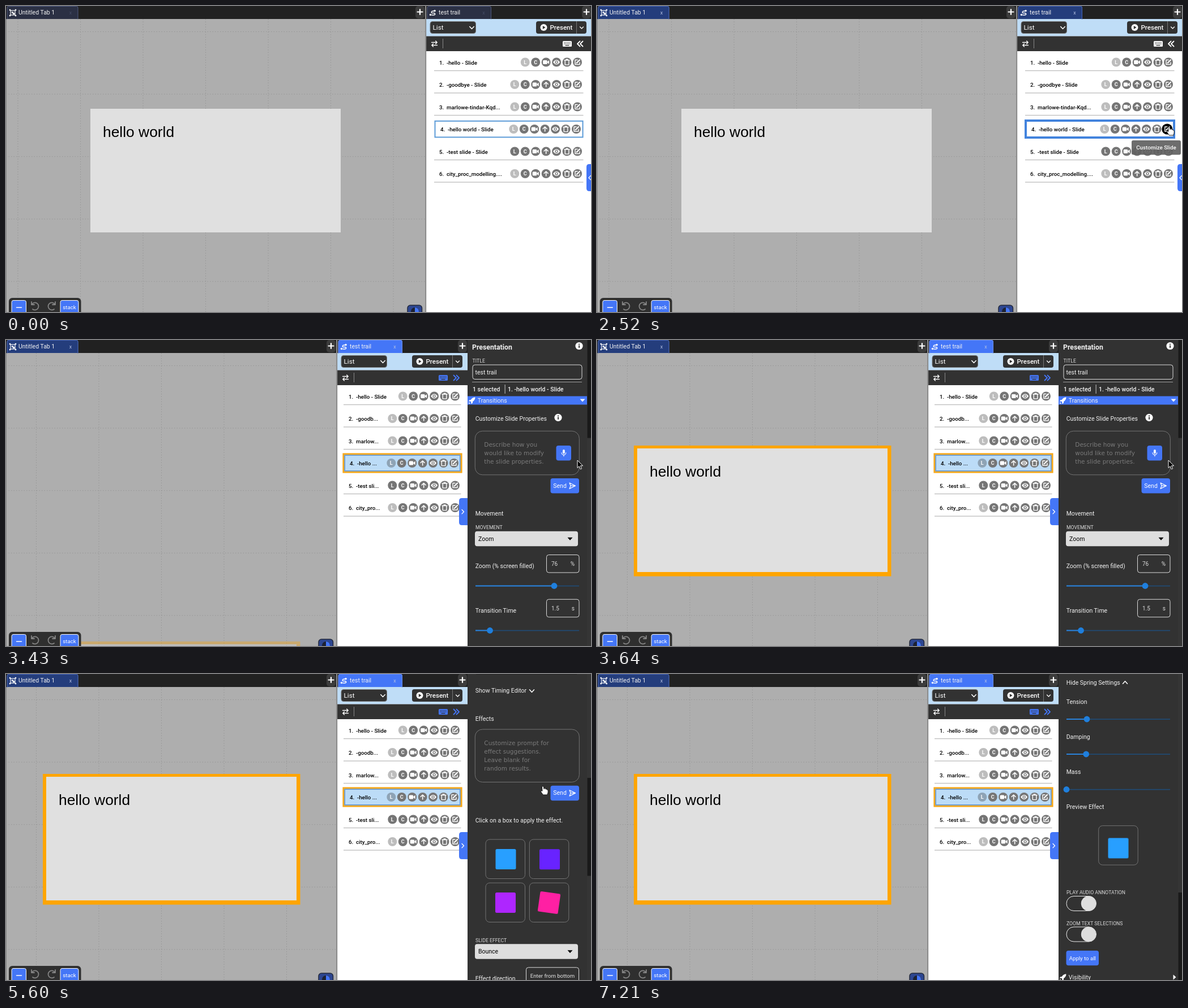
An HTML page for the animation above (7280 ms loop, 1033 by 542 pixels).

```html
<!DOCTYPE html>
<html lang="en">
<head>
<meta charset="utf-8">
<title>Slide trail editor</title>
<style>
html, body { margin: 0; width: 100%; height: 100%; overflow: hidden; background: #323232; }
svg { display: block; width: 1033px; height: 542px; }
text { font-family: Roboto, sans-serif; white-space: pre; }
.hint { font-family: "DejaVu Sans", sans-serif; fill: #7a7a7a; }
.arial { font-family: "Liberation Sans", Arial, sans-serif; }
.m { font-weight: 500; }
.b { font-weight: 700; }
.mid { text-anchor: middle; }
.line { fill: none; stroke-linecap: round; stroke-linejoin: round; }
g { transform-origin: 0 0; }
</style>
</head>
<body>
<svg id="stage" viewBox="0 0 1033 542"></svg>
<script>
const LOOP = 7280, TICK = 70;
const BLUE = '#4476f7', DARK = '#323232';
let css = '';

// Keyframes from [ms, declarations]; motion advances once per tick.
function track(name, points) {
  const pts = [...points];
  if (pts[0][0] > 0) pts.unshift([0, pts[0][1]]);
  if (pts.at(-1)[0] < LOOP) pts.push([LOOP, pts.at(-1)[1]]);
  const frames = pts.map(([t, d], i) => {
    const next = pts[i + 1];
    const n = next ? Math.max(1, Math.round((next[0] - t) / TICK)) : 1;
    return `${(t / LOOP * 100).toFixed(4)}%{${d};animation-timing-function:steps(${n},end)}`;
  });
  css += `@keyframes ${name}{${frames.join('')}}.${name}{animation:${name} ${LOOP}ms infinite}\n`;
}
// Visible from a to b.
function show(name, a, b = LOOP) {
  const pts = a ? [[0, 0], [a - TICK, 0], [a, 1]] : [[0, 1]];
  if (b < LOOP) pts.push([b - TICK, 1], [b, 0]);
  track(name, pts.map(([t, o]) => [t, `opacity:${o}`]));
}
const move = (name, pts) => track(name, pts.map(([t, x, y]) => [t, `transform:translate(${x}px,${y}px)`]));

show('before', 0, 3080);
show('after', 3080);
track('focus', [[280, 'opacity:0'], [420, 'opacity:1']]);
show('picked', 1820, 3080);
show('tip', 2380, 3080);
track('enter', [
  [3360, 380, 0], [3430, 357, .35], [3500, 235, .6], [3570, 105, .85], [3640, 10, 1],
  [3710, -20, 1], [3780, -6, 1], [3850, 3, 1], [3920, 0, 1]
].map(([t, y, o]) => [t, `transform:translate(0px,${y}px);opacity:${o}`]));
move('scroll', [
  [5320, 0, 0], [5390, 0, -150], [5460, 0, -330], [5530, 0, -470], [5600, 0, -575], [5740, 0, -715],
  [5880, 0, -822], [5950, 0, -857], [6090, 0, -900], [6160, 0, -940], [6230, 0, -1040],
  [6300, 0, -1130], [6370, 0, -1185], [6440, 0, -1212], [6580, 0, -1227]
]);
move('thumb', [
  [5320, 0, 0], [5390, 0, 48], [5460, 0, 106], [5600, 0, 184], [5740, 0, 223], [5950, 0, 260],
  [6090, 0, 274], [6160, 0, 288], [6300, 0, 354], [6440, 0, 382], [6580, 0, 387]
]);
track('spin', [[5390, 60], [5600, 8], [5810, -3], [5950, 0]].map(([t, a]) => [t, `transform:rotate(${a}deg)`]));
move('hop', [[7000, 0, 0], [7070, 0, 18], [7140, 0, 12], [7210, 0, 5.5]]);
move('mouse', [
  [630, 855, 178], [1050, 851, 217], [1260, 851, 217], [1400, 828, 219], [1680, 828, 219], [2100, 930, 217],
  [2450, 1010, 214], [2870, 1010, 214], [2940, 1009, 213], [4410, 1009, 213], [4480, 1004, 220],
  [4620, 998, 228], [4760, 998, 228], [4970, 948, 199], [6370, 948, 199], [6580, 648, 452],
  [6650, 648, 452], [6930, 565, 548]
]);
show('arrow1', 350, 2240);
show('hand1', 2240, 3080);
show('arrow2', 3080, 4970);
show('beam', 4970, 5390);
show('hand2', 5390, 6440);
show('arrow3', 6440, 6930);

// Drawing helpers
const text = (x, y, s, size = 10.5, fill = '#f2f2f2', cls = '') =>
  `<text x="${x}" y="${y}" font-size="${size}" fill="${fill}" class="${cls}">${s}</text>`;
const box = (x, y, w, h, fill, r = 0, stroke = 'none', sw = 1) =>
  `<rect x="${x}" y="${y}" width="${w}" height="${h}" rx="${r}" fill="${fill}" stroke="${stroke}" stroke-width="${sw}"/>`;
const line = (d, stroke = '#fff', w = 1.5, extra = '') =>
  `<path class="line" d="${d}" stroke="${stroke}" stroke-width="${w}" ${extra}/>`;
const shape = (d, fill = '#fff') => `<path d="${d}" fill="${fill}"/>`;
const dot = (x, y, r, fill) => `<circle cx="${x}" cy="${y}" r="${r}" fill="${fill}"/>`;
const at = (x, y, s) => `<g transform="translate(${x} ${y})">${s}</g>`;
const group = (cls, s) => `<g class="${cls}">${s}</g>`;

// Left workspace
const frameIcon = at(12, 12, box(-4, -4, 8, 8, 'none', 0, '#fff', 1.2) + box(-2, -2, 3, 3, '#fff') + box(0, 0, 3, 3, '#fff') +
  [-5, 5].map(x => [-5, 5].map(y => box(x - 1.2, y - 1.2, 2.4, 2.4, '#fff')).join('')).join(''));
const trailIcon = dot(-3.5, 3.5, 1.8, '#fff') + line('M-1 4H2C6 4 5 .5 2 .5H0C-3 .5-2-3 1-3H3', '#fff', 1.5) + dot(4, -3.5, 1.8, '#fff');

function tab(x, w, icon, label, lit, fill = '#243d7c', edge = '#4868b8') {
  const skin = (f, e, c) => shape(`M${x} 23V3q0-2.5 2.5-2.5h${w - 5}q2.5 0 2.5 2.5V23z`, f) +
    line(`M${x} 23V3q0-2.5 2.5-2.5h${w - 5}q2.5 0 2.5 2.5V23`, e, 1) + text(x + w - 13, 15, 'x', 9, c, 'mid');
  return skin('#2b3044', '#505a80', '#454d66') + group(lit, skin(fill, edge, '#b6c2e4')) + icon + text(x + 20, 15.3, label);
}
const plus = x => box(x - 8, 0, 16, 22, '#3c3c3c', 5) + line(`M${x - 4.5} 10.5h9M${x} 6v9`, '#fff', 2.2);

function workspace(w, gx, lit) {
  let s = box(0, 23, w, 519, '#aeaeae') + box(0, 23, 1, 519, '#858585');
  const dash = 'stroke-dasharray="1.5 3" style="stroke-linecap:butt"';
  for (let x = gx; x < w; x += 110.5) s += line(`M${x} 23V542`, '#959595', 1, dash);
  for (let y = 45.5; y < 542; y += 110.6) s += line(`M0 ${y}H${w}`, '#959595', 1, dash);
  return s + box(0, 0, w, 23, '#212121') + tab(2, 125, frameIcon, 'Untitled Tab 1', lit) + plus(w - 9);
}
const slide = (x, y) => box(x, y, 442, 219, '#e0e0e0') + text(x + 22, y + 49.5, 'hello world', 26.4, '#000', 'arial');

function tools(w) {
  const turn = 'M-6-7v5h5M-5.5-2.5A6.5 6.5 0 1 1-4 6';
  return box(5, 517, 127.5, 40, '#2f2f2f', 6) +
    box(10, 521.5, 25.5, 30, BLUE, 3, '#fff') + line('M18.5 534h9', '#fff', 1.5) +
    at(51, 531, line(turn, '#858585', 1.8)) + at(81, 531, `<g transform="scale(-1 1)">${line(turn, '#858585', 1.8)}</g>`) +
    box(96, 521.5, 32, 30, BLUE, 3, '#fff') + text(112, 537, 'stack', 9.75, '#fff', 'mid') +
    box(w - 31, 530, 25.5, 30, '#2d4690', 5, '#252b3c', 1.5) + dot(w - 18, 541, 7, '#1d2233') +
    shape(`M${w - 18} 534a7 7 0 0 1 0 14z`, BLUE);
}

// Slide list
const letter = c => text(0, 3.2, c, 9, '#fff', 'b mid');
const icons = {
  L: letter('L'), C: letter('C'),
  cam: box(-5.5, -3.5, 7.5, 7, '#fff', 1.5) + shape('M2.3-.9 5.5-3.2V3.2L2.3.9z'),
  up: line('M0 4V-4M-3.5-.5 0-4 3.5-.5', '#fff', 1.6),
  eye: shape('M-6 0Q0-8 6 0Q0 8-6 0z') + dot(0, 0, 2.7, '#757575') + dot(0, 0, 1.4, '#fff'),
  bin: line('M-4.5-3.5H4.5M-1.5-5H1.5M-3.3-2.8V4.6H3.3V-2.8', '#fff', 1.4),
  edit: line('M0-4H-4V4H4V.5', '#fff', 1.4) + line('M-1.3 1.3 4-4', '#fff', 2.2)
};
const disc = (x, y, name, fill = '#757575', r = 8) => at(x, y, dot(0, 0, r, fill) + icons[name]);

const rows = [
  ['-hello - Slide', '-hello - Slide'],
  ['-goodbye - Slide', '-goodb...'],
  ['marlowe-tindar-Kqd...', 'marlow...'],
  ['-hello world - Slide', '-hello ...'],
  ['-test slide - Slide', '-test sli...'],
  ['city_proc_modelling....', 'city_pro...']
];
function row(i, open) {
  const y = 99.5 + 39.5 * i, left = open ? 596 : 756, right = open ? 803.5 : 1019.5;
  const cur = i === 3, pad = cur ? 2 : 0;
  let s = '';
  if (!cur) s += box(left, y + 14.4, right - left, 1.3, '#bdbdbd');
  else if (open) s += box(596, 202, 208, 32, '#bcdcf7', 0, '#f5a81c', 3.2) + box(598.2, 204.2, 203.6, 27.6, 'none', 0, '#6297d4', 1.6);
  else s += box(757.5, 203.8, 261, 28.6, '#fff', 0, '#5c9bd8', 2) + group('picked', box(757, 203, 262, 30, '#fff', 0, '#4283dd', 4));
  s += text(left + 9 + pad, y + 4.4, i + 1 + '.', 9.75, '#000', 'm') + text(left + 22 + pad, y + 4.4, rows[i][open ? 1 : 0], 9.75, '#000', 'm');
  const names = ['L', 'C', 'cam', 'up', 'eye', 'bin', 'edit'].filter(n => i || n !== 'up');
  names.reverse().forEach((n, k) => {
    const pale = n === 'L' && i !== 4;
    s += disc(right - 10.5 - pad - 18.45 * k, y, n, pale ? (cur && open ? '#8ea3b5' : '#bdbdbd') : '#757575');
  });
  return s;
}
const chevron = (x, y, w, h, c = '#fff', sw = 1.5) => line(`M${x - w} ${y - h / 2}l${w} ${h} ${w} ${-h}`, c, sw);

function list(open) {
  const a = open ? -157 : 0, r = open ? -219 : 0, x = 742 + a, end = 1033 + (open ? -218 : 0);
  const tint = open ? BLUE : '#fff', kx = 991 + r, dir = open ? 1 : -1;
  let keys = '';
  for (let i = 0; i < 5; i++) keys += box(kx - 5.8 + i * 2.5, 64, 1.3, 1.3, DARK) + box(kx - 5.8 + i * 2.5, 66.4, 1.3, 1.3, DARK);
  const arrows = [-3, 2].map(d => line(`M${1014.5 + r + d - dir * 2} 62.5l${dir * 4.5} 4.5-${0}${dir * -4.5} 4.5`.replace('-0', ' '), tint, 1.8)).join('');
  return box(x, 0, end - x, 542, '#fff') + box(x, 0, end - x, 23, '#212121') + box(x, 23, end - x, 30.5, '#bfddf7') +
    box(x, 53.5, end - x, 26.5, DARK) +
    tab(744 + a, 112.5, at(753 + a, 12, trailIcon), 'test trail', open ? '' : 'picked', ...(open ? [BLUE, '#6c93fa'] : [])) +
    plus(1025 + r) +
    box(749 + a, 27.5, 80.5, 21, DARK, 4, '#777') + text(753.5 + a, 42, 'List', 11.8, '#fff') + chevron(822.5 + a, 38.5, 3.8, 4) +
    box(936 + r, 27, 89, 22, DARK, 4) + dot(949.5 + r, 38, 6, '#fff') + shape(`M${947.8 + r} 35l4.8 3-4.8 3z`, DARK) +
    text(960.5 + r, 42.2, 'Present', 11.5, '#fff', 'm') + box(1007 + r, 27, 1, 22, '#777') + chevron(1016.5 + r, 38.5, 3, 3, '#fff', 1.3) +
    line(`M${751.5 + a} 64.5h9.5m-2.3-2.5 2.5 2.5-2.5 2.5M${761.5 + a} 69.5h-9.5m2.3-2.5-2.5 2.5 2.5 2.5`, '#fff', 1.4) +
    box(771 + a, 58, 1, 17, '#888') +
    box(kx - 8, 62, 16, 10, tint, 1.5) + keys + box(kx - 3.5, 69, 7, 1.3, DARK) + arrows +
    rows.map((_, i) => row(i, open)).join('') +
    box(740 + a, 0, 2.2, 542, '#8c8c8c') +
    shape(`M${end} 280h-${open ? 10 : 3}q-5 0-5 5v38q0 5 5 5h${open ? 10 : 3}z`, BLUE) +
    line(open ? 'M805 300.5l3.5 3.7-3.5 3.7' : 'M1032.5 300.5l-3.5 3.7 3.5 3.7', '#fff', 1.3);
}

// Property panel
const info = (x, y) => dot(x, y, 6.6, '#fff') + box(x - .9, y - 1, 1.9, 4.4, DARK) + dot(x, y - 3, 1.1, DARK);
const caps = (y, s) => text(829, y, s, 8.7, '#dcdcdc');
const label = (y, s) => text(828.7, y, s);
const select = (y, s) => box(828, y, 182, 26.5, '#dedede', 4) + text(834, y + 17, s, 10.5, '#000') + shape(`M991.5 ${y + 11}h9l-4.5 5z`, '#000');
const field = (y, v, unit) => box(954.5, y, 57.5, 31.5, 'none', 4, '#dcdcdc') + text(963, y + 19.5, v, 10, '#ddd') + text(1004, y + 19.5, unit, 10, '#ddd', 'end" text-anchor="end');
const slider = (y, x) => box(829, y - .7, 183, 1.6, '#1f4c78') + box(829, y - 1, x - 829, 2, '#2a83dc') + dot(x, y, 5.4, '#1f7fdd');
const send = y => box(961.5, y, 50.5, 26.5, BLUE, 4) + text(966.3, y + 16.6, 'Send', 10.5, '#fff') +
  line(`M995 ${y + 8}l10.5 5.2-10.5 5.2 2-5.2zM997 ${y + 13.2}h8`, '#fff', 1.2);
const prompt = (y, h, lines) => box(828.3, y, 184, h, 'none', 13, '#747474') +
  lines.map((s, i) => text(844.3, y + 27.7 + i * 15.1, s, 10.5, '#7a7a7a', 'hint')).join('');
const rocket = y => at(823, y, shape('M5.5-5.5C1-5.5-1-3-2-1L-5-.5-6 2-3 1.5-1.5 3-2 6 .8 5 1.2 2C3.5 .5 5.5-2 5.5-5.5zM-5.5 3-3 5.5-6 6z'));
const cell = (x, y) => box(x, y, 69.5, 69.5, 'none', 7, '#737373');
const square = (x, y, fill, cls = '') => at(x, y, group(cls, box(-18, -18, 36, 36, fill, 2.5)));
const toggle = y => box(829, y, 52.5, 26, DARK, 13, '#ededed') + dot(868, y + 13, 13.2, '#dedede');

const topPart = text(823, 17, 'Presentation', 12.3, '#f2f2f2', 'b') + info(1012, 10.5) +
  text(823.6, 40, 'TITLE', 8.7, '#dcdcdc') + box(824, 44, 193, 25.5, 'none', 4, '#dcdcdc') + text(828.5, 60.5, 'test trail') +
  box(823, 74, 194, 1, '#9a9a9a') + text(824, 91, '1 selected', 10.5, '#f2f2f2', 'm') + box(880.6, 79, 1.1, 16, '#bbb') +
  text(886, 91.3, '1. -hello world - Slide', 10.5, '#f2f2f2', 'm') +
  box(815, 99.5, 211, 15, BLUE) + rocket(107) + text(832.8, 111, 'Transitions') + shape('M1013.5 104.5h9l-4.5 5z') +
  label(143, 'Customize Slide Properties') + info(975, 137.3) +
  prompt(161.3, 77.5, ['Describe how you', 'would like to modify', 'the slide properties.']) +
  box(971.5, 187, 26.5, 26.5, BLUE, 4) + box(983, 194, 3.8, 7.5, '#fff', 1.9) + line('M981 199.5a3.9 3.9 0 0 0 7.8 0M984.9 203.5v2.5', '#fff', 1.1) +
  send(245) + label(310.7, 'Movement') + caps(335, 'MOVEMENT') + select(338.7, 'Zoom') +
  label(404, 'Zoom (% screen filled)') + field(380.5, '76', '%') + slider(435.5, 968) +
  label(482.7, 'Transition Time') + field(459.3, '1.5', 's') + slider(514.5, 854.5);

const midPart = box(830, -1, 178, 1.8, '#222') + label(33, 'Show Timing Editor') + chevron(928.5, 30, 4, 4.5) + label(83, 'Effects') +
  prompt(98, 93.5, ['Customize prompt for', 'effect suggestions.', 'Leave blank for', 'random results.']) + send(197.7) +
  label(263, 'Click on a box to apply the effect.') +
  cell(847, 293) + cell(924.3, 293) + cell(847, 370) + cell(924.3, 370) +
  square(882.5, 328, '#289fff') + square(960, 328.3, '#6823ff') + square(882, 405, '#ae26ff') + square(959, 405, '#ff20a3', 'spin') +
  caps(474.5, 'SLIDE EFFECT') + select(478.3, 'Bounce');

const pointer = (x, d) => at(x, 291.5, line(d, '#fff', 1.9));
const lowPart = label(260.5, 'Effect direction') + box(918.5, 237.8, 93, 29, 'none', 4, '#dcdcdc') +
  text(965, 255.5, 'Enter from bottom', 9.6, '#e6e6e6', 'mid') +
  pointer(842, 'M-5 0H5M1-4 5 0 1 4') + pointer(875, 'M5 0H-5M-1-4-5 0-1 4') + pointer(908.5, 'M0-5V5M-4 1 0 5 4 1') +
  box(928.5, 278.3, 26.5, 26.5, BLUE, 4) + pointer(941.8, 'M0 5V-5M-4-1 0-5 4-1') +
  caps(325.5, 'EFFECT TIMING') + select(329, 'Custom') +
  label(389, 'Hide Spring Settings') + chevron(932.5, 385, 4, -4.5) +
  label(422.5, 'Tension') + slider(450, 865) + label(485, 'Damping') + slider(512, 863.7);

const endPart = label(176.5, 'Mass') + slider(204.5, 829) + label(239, 'Preview Effect') + cell(885.7, 268.7) +
  square(920.5, 303, '#289fff', 'hop') +
  caps(389.5, 'PLAY AUDIO ANNOTATION') + toggle(393.5) + caps(444.5, 'ZOOM TEXT SELECTIONS') + toggle(448) +
  box(828.5, 490, 57.5, 26.3, BLUE, 4) + text(857.3, 506.5, 'Apply to all', 9.6, '#fff', 'mid') +
  rocket(537) + text(832.8, 541, 'Visibility') + shape('M1017.5 532.5v9l5-4.5z');

const panel = box(815, 0, 218, 542, DARK) +
  group('scroll', topPart + at(0, 575, midPart) + at(0, 857, lowPart) + at(0, 1227, endPart)) +
  box(1026, 0, 7, 542, '#353535') + group('thumb', box(1026.5, 0, 6.5, 173.5, '#191919'));

// Pointers, hotspot at 0,0
const ink = (d, w = 1) => `<path d="${d}" fill="#000" stroke="#fff" stroke-width="${w}" stroke-linejoin="round"/>`;
const arrow = ink('M0 0V13.5L3.1 10.7 5.3 15.8 7.6 14.8 5.4 9.8H9.6z');
const hand = ink('M-1.6 0.6Q0-1 1.4 .6L2.2 5Q4-.0 5 5Q7 4 7.4 6Q9.2 5.5 9.2 8Q9.6 11 7.8 15H.2Q-1.5 12-4 9Q-4.2 7-1 8.2z', 1)
  .replace('#000', '#fff').replace('stroke="#fff"', 'stroke="#111"');
const beam = line('M-3-8Q0-8 0-6V6Q0 8-3 8M3-8Q0-8 0-6M0 6Q0 8 3 8', '#e8e8e8', 2) + line('M-3-8Q0-8 0-6V6Q0 8-3 8M3-8Q0-8 0-6M0 6Q0 8 3 8', '#111', 1);
const mouse = group('mouse', ['arrow1', 'arrow2', 'arrow3'].map(c => group(c, arrow)).join('') +
  group('hand1', hand) + group('hand2', hand) + group('beam', beam));

const tooltip = disc(1006.8, 218, 'edit', '#000', 9.5) +
  `<g opacity=".92">${box(944, 238, 87, 25.5, '#616161', 3)}</g>` + text(987.5, 254.3, 'Customize Slide', 9.75, '#fff', 'm mid');

const sheet = document.createElement('style');
sheet.textContent = css;
document.head.append(sheet);
document.getElementById('stage').innerHTML =
  group('before', workspace(740, 21, 'focus') + slide(149, 182) + tools(740) + list(false) + group('tip', tooltip)) +
  group('after', workspace(583, 53.5, '') + group('enter', box(65, 177, 454.5, 231.5, '#ffa500') + slide(71, 182)) +
    tools(583) + list(true) + panel) + mouse;
</script>
</body>
</html>
```
